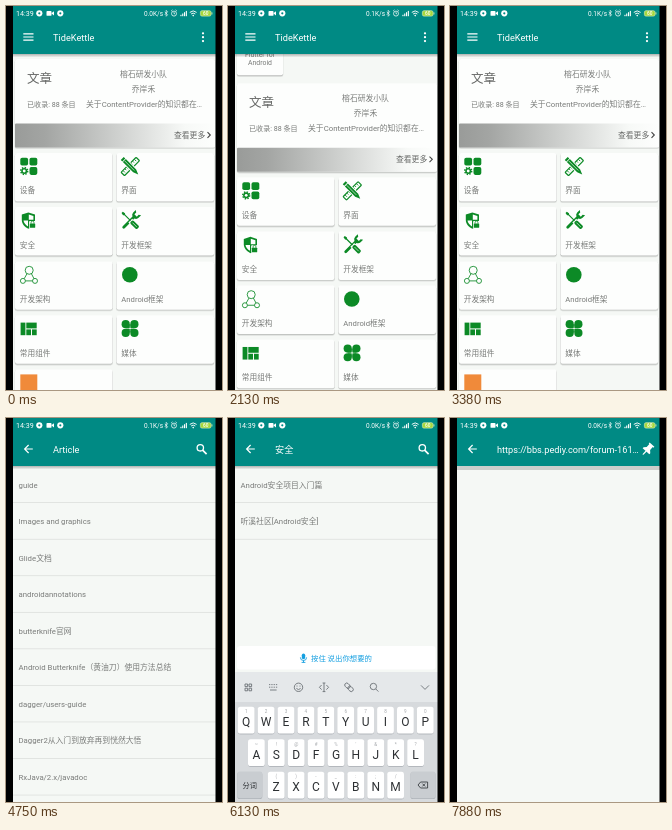
Write an HTML page that moves like this. It is 216 px wide and 384 px high and loops after 8 s.

```html
<!DOCTYPE html>
<html lang="zh-CN">
<head>
<meta charset="utf-8">
<title>App demo</title>
<style>
html, body { margin: 0; width: 100%; height: 100%; overflow: hidden; background: #000; }
svg { display: block; width: 100vw; height: 100vh; }
text { font-family: Roboto, "Noto Sans CJK SC", "Noto Sans CJK", sans-serif; white-space: pre; }
</style>
</head>
<body>
<svg id="stage" viewBox="0 0 216 384"></svg>
<script>
const LOOP = 8000, TEAL = '#008a84', BG = '#f5f8f5', GREEN = '#0c8a26', GREY = '#7a7c7a';

// Markup helpers; text is placed by its vertical centre
const text = (x, y, s, size = 7.8, fill = GREY, extra = '') =>
  `<text x="${x}" y="${(y + size * 0.36).toFixed(2)}" font-size="${size}" fill="${fill}" ${extra}>${s}</text>`;
const mid = (x, y, s, size, fill, extra = '') => text(x, y, s, size, fill, 'text-anchor="middle" ' + extra);
const rect = (x, y, w, h, fill, r = 0, extra = '') =>
  `<rect x="${x}" y="${y}" width="${w}" height="${h}" rx="${r}" fill="${fill}" ${extra}/>`;
const circle = (x, y, r, fill, extra = '') => `<circle cx="${x}" cy="${y}" r="${r}" fill="${fill}" ${extra}/>`;
const path = (d, fill, extra = '') => `<path d="${d}" fill="${fill}" ${extra}/>`;
const line = (d, stroke, w = 1, extra = '') => path(d, 'none', `stroke="${stroke}" stroke-width="${w}" ${extra}`);
const group = (x, y, body, id = '') => `<g ${id && `id="${id}"`} transform="translate(${x} ${y})">${body}</g>`;
const card = (x, y, w, h) =>
  rect(x - 0.4, y + 0.9, w + 0.8, h + 0.7, '#000', 2.4, 'opacity=".1"') +
  rect(x, y + 0.6, w, h, '#000', 2, 'opacity=".16"') + rect(x, y, w, h, '#fdfefd', 2);

const gear = (x, y, r, fill, hole) => circle(x, y, r * 0.72, fill) +
  circle(x, y, r * 0.82, 'none', `stroke="${fill}" stroke-width="${r * 0.36}" stroke-dasharray="${r * 0.33} ${r * 0.314}"`) +
  circle(x, y, r * 0.34, hole);

// Grid icons, each in an 18 x 18 box
const crossed = (a, b) => `<g transform="rotate(45 9 9)">${a}</g><g transform="rotate(-45 9 9)">${b}</g>`;
const icons = {
  device: rect(0.5, 0.3, 7.8, 7.8, GREEN, 1.8) + rect(9.7, 0.3, 7.8, 7.8, GREEN, 1.8) +
    rect(9.7, 9.6, 7.8, 7.8, GREEN, 1.8) + gear(4.4, 13.5, 4.2, GREEN, '#fff'),
  design: crossed(
    rect(6.6, -1.6, 4.8, 21.2, 'none', 0.6, `stroke="${GREEN}" stroke-width="1.2"`) +
    line('M7 1h2.4M7 3.6h1.8M7 6h2.4M7 12h2.4M7 14.4h1.8M7 17h2.4', GREEN, 0.9),
    rect(6, -2, 6, 20, '#fdfefd') + path('M6.9-2.4h4.2v2.2H6.9zM6.9.6h4.2v14.6L9 20.2l-2.1-5z', GREEN) +
    line('M9 1v13.6', '#fdfefd', 0.6)),
  shield: path('M8.6 .8 15.2 3v5.4c0 4-2.8 7.2-6.6 8.8C4.8 15.6 2 12.4 2 8.4V3z', GREEN) +
    path('M9 2.9 13.6 4.4v3.8H9zM8.2 9v5.8C5.8 13.4 4 11.4 3.7 9z', '#fdfefd') +
    rect(9.3, 9.3, 6.8, 7.4, '#fdfefd', 0.8) + rect(10, 11.8, 5.4, 4.4, GREEN, 0.5) +
    line('M11.3 12v-1.2a1.4 1.4 0 0 1 2.8 0V12', GREEN, 0.8),
  tools: crossed(
    path('M5.3-2.4v3.6a3.8 3.8 0 0 0 2.4 3.4v13.8a1.4 1.4 0 0 0 2.8 0V4.6a3.8 3.8 0 0 0 2.4-3.4v-3.6L10.8-1v2.6H7.4V-1z', GREEN),
    rect(6.3, 9, 5.4, 11, '#fdfefd') + path('M8.2-2.6h1.8l.5 2.6-.8 1v8.2H8.5V1L7.7 0z', GREEN) +
    rect(7, 10.2, 4.2, 9.6, GREEN, 1.5) + line('M9.1 12v6', '#fdfefd', 0.6)),
  nodes: `<g fill="none" stroke="${GREEN}" stroke-width=".85">` +
    '<circle cx="9.4" cy="4.6" r="4"/><circle cx="3.1" cy="15.2" r="2.5"/><circle cx="15.2" cy="15.2" r="2.5"/>' +
    '<path d="M7.2 8 4.4 13M11.6 8l2.6 5M5.6 15.2h7.1"/></g>',
  disc: circle(8.5, 9, 7.8, GREEN),
  blocks: rect(0.8, 2.8, 4.8, 12.6, GREEN) + rect(6.5, 2.8, 10.4, 5.8, GREEN) +
    rect(6.5, 9.6, 4.7, 5.8, GREEN) + rect(12.2, 9.6, 4.7, 5.8, GREEN),
  clover: [[0, 0], [8.7, 0], [0, 8.7], [8.7, 8.7]].map(([x, y]) =>
    circle(x + 4.4, y + 4.4, 4.1, GREEN) + rect(x ? 9 : 4.5, y ? 9 : 4.5, 4, 4, GREEN, 0.8)).join(''),
  square: rect(0.5, 0.5, 17, 17, '#f08a3a')
};

// Toolbar icons
const back = line('M26.8 31H18.8M22.6 27 18.6 31l4 4', '#fff', 1.15);
const menu = line('M17.3 27.8h10.2M17.3 31h10.2M17.3 34.2h10.2', '#fff', 1.2);
const dots = [27.3, 31.2, 35.1].map(y => circle(197, y, 1.15, '#fff')).join('');
const lens = circle(194.3, 29.8, 3.2, 'none', 'stroke="#fff" stroke-width="1.3"') +
  line('M196.6 32.2 200.6 36.2', '#fff', 1.7);
const pin = '<g transform="rotate(42 198 31)">' +
  path('M194.8 25h6.4v1.4h-.9v4l2.2 2.2v1.4h-9v-1.4l2.2-2.2v-4h-.9zM197.4 34h1.2v4l-.6 1-.6-1z', '#fff') + '</g>';

const header = (title, left, right, id = '') =>
  rect(7, 48, 203, 3.5, 'url(#shade)') + rect(7, 0, 203, 48, TEAL) + left + right +
  text(47, 31.5, title, 9.2, '#fff', id && `id="${id}"`);
const page = body => rect(7, 0, 203, 384, BG) + body;

function homePage() {
  const tiles = [
    ['device', '设备'], ['design', '界面'], ['shield', '安全'], ['tools', '开发框架'], ['nodes', '开发架构'],
    ['disc', 'Android框架'], ['blocks', '常用组件'], ['clover', '媒体'], ['square', 'Kotlin']
  ].map(([icon, label], i) => {
    const x = i % 2 ? 110.5 : 9, y = 147 + 54.1 * (i >> 1);
    return card(x, y, 97.5, 48.5) + group(x + 4.8, y + 4.5, icons[icon]) + text(x + 4.8, y + 37.7, label, 7.7);
  }).join('');
  const saved = text(13, -36.5, '已收藏文章', 7) + card(9, -24, 46, 69) + circle(32, 0.8, 10, '#45c0ee') +
    mid(32, 24, 'Flutter for', 6.9, GREY) + mid(32, 32, 'Android', 6.9, GREY);
  const article = card(9, 53, 200, 88.5) + rect(9, 117.5, 200, 24, 'url(#bar)', 1) +
    text(21, 72, '文章', 12.5, '#666866') + text(21, 98, '已收录: 88 条目', 7.1) +
    mid(137.5, 68.3, '榕石研发小队', 7.8, GREY) + mid(137.5, 83, '乔岸禾', 7.8, GREY) +
    mid(138, 97.7, '关于ContentProvider的知识都在…', 7.8, GREY) +
    text(168, 129, '查看更多', 7.8, '#656765') + line('M201.5 126.2l2.8 2.8-2.8 2.8', '#444', 1.1);
  return page(group(0, 0, saved + article + tiles, 'scroll') + header('TideKettle', menu, dots));
}

const rows = list => list.map((s, i) => {
  const y = 66.7 + 36.55 * i;
  return text(12.5, y, s) + rect(7, y + 17.6, 203, 0.7, '#d9dcd9');
}).join('');

const articles = ['guide', 'Images and graphics', 'Glide文档', 'androidannotations', 'butterknife官网',
  'Android Butterknife（黄油刀）使用方法总结', 'dagger/users-guide', 'Dagger2从入门到放弃再到恍然大悟', 'RxJava/2.x/javadoc'];

function keyboard() {
  const key = (x, y, s, sub) => rect(x - 8.4, y - 12.6, 16.8, 27, '#b4b8bd', 2.6) +
    rect(x - 8.4, y - 13.2, 16.8, 26.8, '#fff', 2.6) +
    mid(x, y - 8.6, sub, 4.6, '#a6a9ad') + mid(x, y + 2, s, 12, '#2d3033');
  const keyRow = (letters, subs, x, y) =>
    [...letters].map((s, i) => key(x + 19.9 * i, y, s, subs[i].replace('&', '&amp;'))).join('');
  const wide = x => rect(x, 354, 25, 27, '#aeb3b8', 2.6) + rect(x, 353.4, 25, 26.8, '#c9cdd1', 2.6);
  const tools = '<g fill="none" stroke="#6d7277" stroke-width=".9">' +
    '<path d="M17 266h2.6v2.6H17zM21 266h2.6v2.6H21zM17 270.2h2.6v2.6H17zM21 270.2h2.6v2.6H21z"/>' +
    '<path stroke-dasharray="1.3 1" d="M41 266.6h9M41 269.2h9"/><path d="M42 272h6.6"/>' +
    '<circle cx="70.5" cy="269.3" r="4.2"/><path d="M68.4 270.4q2.1 2.4 4.2 0M69 267.6v.9M72 267.6v.9"/>' +
    '<path d="M96 265v8.6M94.6 265h2.8M94.6 273.6h2.8M93.6 267l-2.2 2.3 2.2 2.3M98.4 267l2.2 2.3-2.2 2.3"/>' +
    '<g transform="rotate(45 121 269.3)"><rect x="115.8" y="267.3" width="6" height="4" rx="2"/>' +
    '<rect x="120.2" y="267.3" width="6" height="4" rx="2"/></g>' +
    '<circle cx="145.4" cy="268.5" r="3.2"/><path d="M147.8 271l2.6 2.6M193 267.4l4 4 4-4"/></g>';
  const mic = rect(73.8, 235.6, 3.4, 5.6, '#159fe0', 1.7) +
    line('M72.4 239.4a3.1 3.1 0 0 0 6.2 0M75.5 242.4v2M73.6 244.4h3.8', '#159fe0', 0.9);
  return rect(9, 228, 198.5, 23.5, '#fff', 3) + mic + text(83, 240, '按住 说出你想要的', 7.4, '#159fe0') +
    rect(7, 254, 203, 130, '#d7dadd') + rect(7, 254, 203, 30, '#e5e8ea') + tools +
    keyRow('QWERTYUIOP', '1234567890', 18.2, 302) + keyRow('ASDFGHJKL', '~!@#%\'&*?', 28.4, 334.5) +
    wide(9.3) + mid(21.8, 367, '分词', 7.2, '#2d3033', 'font-weight="500"') +
    keyRow('ZXCVBNM', '()-_:;/', 48.2, 367) + wide(182.5) +
    line('M190 367l2.6-3h7v6h-7zM194.4 365.6l2.8 2.8M197.2 365.6l-2.8 2.8', '#3c4043', 0.9);
}

const statusBar = text(10, 7.5, '14:39', 7.1, '#fff') +
  circle(33.3, 7.3, 3.1, '#fff') + circle(33.3, 7.3, 1.1, TEAL) +
  rect(40.5, 4.9, 5, 4.9, '#fff', 0.9) + path('M45.3 7.3 48 5.2v4.3z', '#fff') +
  circle(54.3, 7.3, 3.1, '#fff') + circle(54.3, 7.3, 1.1, TEAL) +
  text(138, 7.5, '', 6.5, '#fff', 'id="speed"') +
  line('M158.8 5.8l2.8 3-1.4 1.5V4.3l1.4 1.5-2.8 3', '#fff', 0.65) +
  circle(168, 7.6, 2.5, 'none', 'stroke="#fff" stroke-width=".75"') +
  line('M168 6.1v1.6h1.1M165 5.2l1.5-1.4M171 5.2l-1.5-1.4', '#fff', 0.7) +
  [0, 1, 2, 3].map(i => rect(174.4 + i * 1.8, 8.8 - i * 1.3, 1.1, 1.4 + i * 1.3, '#fff')).join('') +
  line('M183.8 6.4q3.4-3 6.8 0M185.1 8q2.1-1.8 4.2 0', '#fff', 0.95) + circle(187.2, 9.6, 0.8, '#fff') +
  rect(194.4, 4.7, 10.6, 5.4, '#a5d83c', 1.6, 'stroke="#cfe8b0" stroke-width=".7"') +
  rect(205.5, 6.2, 0.9, 2.4, '#cfe8b0', 0.4) + mid(199.7, 7.5, '60', 4.8, '#fff', 'font-weight="500"');

const stage = document.getElementById('stage');
stage.innerHTML = `<defs>
  <linearGradient id="shade" x2="0" y2="1"><stop stop-color="#000" stop-opacity=".28"/><stop offset="1" stop-color="#000" stop-opacity="0"/></linearGradient>
  <linearGradient id="bar"><stop stop-color="#999b99"/><stop offset=".15" stop-color="#a3a5a3"/><stop offset=".85" stop-color="#f7f9f7"/><stop offset="1" stop-color="#fdfefd"/></linearGradient>
  </defs>` + rect(0, 0, 216, 384, '#000') + homePage() +
  group(0, 0, page(rows(articles) + header('Article', back, lens)), 'articles') +
  group(0, 0, page(rows(['Android安全项目入门篇', '听溪社区[Android安全]']) + header('安全', back, lens)), 'security') +
  group(0, 0, keyboard(), 'keys') +
  group(0, 0, page(header('https://bbs.pediy.com/forum-161…', back, pin, 'url') +
    rect(7, 48, 203, 4, '#cbcecb')), 'web') +
  rect(7, 0, 203, 15, TEAL) + statusBar + rect(0, 0, 7, 384, '#000') + rect(209.5, 0, 6.5, 384, '#000');

const el = id => document.getElementById(id);
const [list, articlePage, security, keys, web, url, speed] =
  ['scroll', 'articles', 'security', 'keys', 'web', 'url', 'speed'].map(el);

// Eased 0..1 progress between two times
function ramp(t, a, b) {
  const p = Math.min(1, Math.max(0, (t - a) / (b - a)));
  return p * p * (3 - 2 * p);
}
const move = (node, x, y) => node.setAttribute('transform', `translate(${x.toFixed(2)} ${y.toFixed(2)})`);

function draw(t) {
  const reveal = ramp(t, 180, 700) - ramp(t, 900, 1430) + ramp(t, 1900, 2600) - ramp(t, 2800, 3360);
  move(list, 0, 96.3 * reveal);
  move(articlePage, 204 * (1 - ramp(t, 3750, 4250) + ramp(t, 4860, 5200)), 0);
  move(security, 204 * (1 - ramp(t, 5380, 5680)), 0);
  move(keys, 0, 160 * (1 - ramp(t, 5760, 6060) + ramp(t, 6200, 6500)));
  move(web, 204 * (1 - ramp(t, 6850, 7250)), 0);
  url.setAttribute('opacity', t < 7630 ? 0 : 1);
  speed.textContent = t >= 750 && t < 5200 ? '0.1K/s' : '0.0K/s';
}

let start;
function frame(now) {
  start ??= now;
  draw((now - start) % LOOP);
  requestAnimationFrame(frame);
}
draw(0);
requestAnimationFrame(frame);
</script>
</body>
</html>
```
